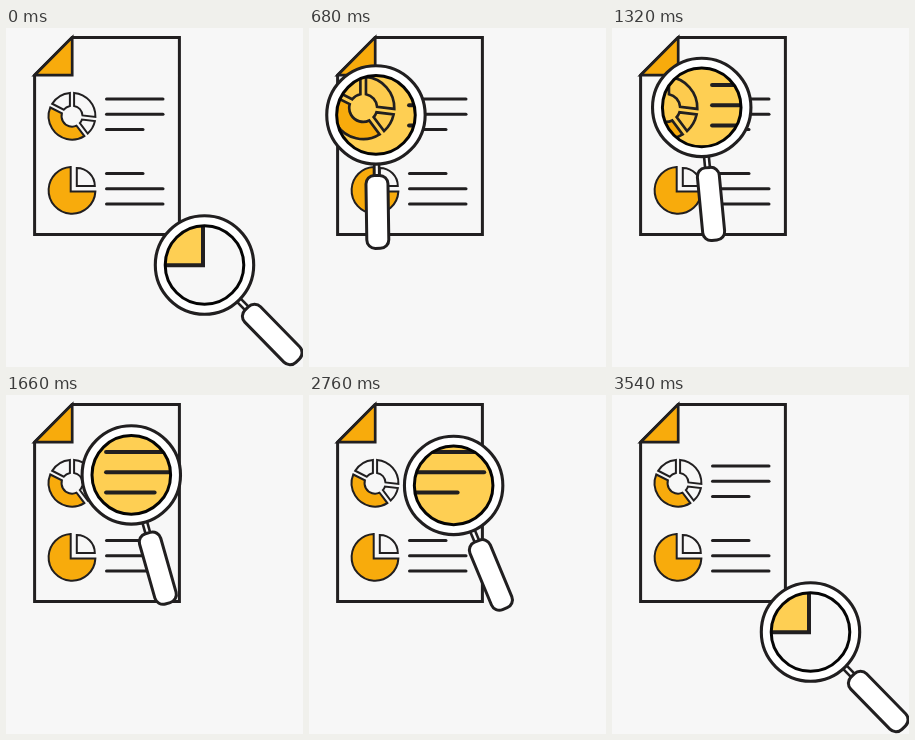
Recreate the animation shown at these times as an HTML page with a canvas. Size 297 by 339 pixels, loop 3730 ms.

```html
<!DOCTYPE html>
<html lang="en">
<head>
<meta charset="utf-8">
<title>Report under a magnifying glass</title>
<style>
  html, body { margin: 0; width: 100%; height: 100%; overflow: hidden; background: #f7f7f7; }
  canvas { display: block; width: 297px; height: 339px; }
</style>
</head>
<body>
<canvas id="stage" width="297" height="339"></canvas>
<script>
const ctx = document.getElementById('stage').getContext('2d');
const LOOP = 3730, STEP = 20, REST = 3540;
const INK = '#211f20', PAPER = '#f7f7f7', ORANGE = '#f8ab0c', YELLOW = '#fecf53';
const ZOOM = 1.33, ZOOM_X = -33.6, ZOOM_Y = -37.4;
const TURN = 2 * Math.PI;
const rad = deg => deg * TURN / 360;

// Where the lens pauses: time, centre
const STOPS = [
  { t: 0, x: 198.5, y: 237 },
  { t: 820, x: 65.7, y: 85.5 },
  { t: 1000, x: 59, y: 79 },
  { t: 2060, x: 133.5, y: 80 },
  { t: 2360, x: 128, y: 79 },
  { t: 2680, x: 141, y: 80.5 },
  { t: 3500, x: 198.5, y: 237 }
];

// Smooth start, longer slow-down
function ease(u) {
  const w = 1 - (1 - u) ** 1.62;
  return w * w * (3 - 2 * w);
}

function lensAt(t) {
  const next = STOPS.findIndex(s => s.t > t);
  if (next < 0) return STOPS[STOPS.length - 1];
  const a = STOPS[next - 1], b = STOPS[next];
  const k = ease((t - a.t) / (b.t - a.t));
  return { x: a.x + (b.x - a.x) * k, y: a.y + (b.y - a.y) * k };
}

// The handle swings out as the lens moves right
const tiltAt = x => rad(44.5) * (Math.max(0, x - 59) / 140) ** 1.38;

function paint(fill, width, stroke = INK) {
  if (fill) { ctx.fillStyle = fill; ctx.fill(); }
  ctx.lineWidth = width;
  ctx.strokeStyle = stroke;
  ctx.stroke();
}

function polygon(points, fill, width) {
  ctx.beginPath();
  points.forEach(p => ctx.lineTo(...p));
  ctx.closePath();
  paint(fill, width);
}

function circle(r, fill, width, stroke) {
  ctx.beginPath();
  ctx.arc(0, 0, r, 0, TURN);
  paint(fill, width, stroke);
}

function line(x1, y1, x2, y2, width) {
  ctx.beginPath();
  ctx.moveTo(x1, y1);
  ctx.lineTo(x2, y2);
  paint(null, width);
}

function ringPart(from, to, fill) {
  const outer = 23.4, inner = 10.5, gap = 2.1;
  ctx.beginPath();
  ctx.arc(66, 88.2, outer, rad(from) + gap / outer, rad(to) - gap / outer);
  ctx.arc(66, 88.2, inner, rad(to) - gap / inner, rad(from) + gap / inner, true);
  ctx.closePath();
  paint(fill, 2);
}

function drawPie(blank) {
  const x = 66, y = 162.3, r = 23.4, cut = 1.3;
  ctx.beginPath();
  ctx.moveTo(x - cut, y + cut);
  ctx.arc(x, y, r, cut / r, TURN * 0.75 - cut / r);
  ctx.closePath();
  paint(ORANGE, 2);

  ctx.beginPath();
  ctx.moveTo(x + 4.8, y - 4.3);
  ctx.arc(x + 4.8, y - 4.3, 18, -TURN / 4, 0);
  ctx.closePath();
  paint(blank, 2);
}

function drawReport(paper, blank) {
  ctx.lineJoin = 'miter';
  polygon([[66, 9.4], [173.4, 9.4], [173.4, 206.5], [28.6, 206.5], [28.6, 47.2]], paper, 3);
  polygon([[28.6, 47.2], [66.2, 47.2], [66.2, 9.4]], ORANGE, 2.7);

  const cuts = [7, 53, 207, 270, 367];
  for (let i = 0; i < 4; i++) ringPart(cuts[i], cuts[i + 1], i === 1 ? ORANGE : blank);
  drawPie(blank);

  // Two text blocks, mirrored top to bottom
  ctx.lineCap = 'round';
  for (let i = 0; i < 3; i++) {
    const end = i < 2 ? 157 : 137;
    line(100.5, 71 + 15.2 * i, end, 71 + 15.2 * i, 3);
    line(100.5, 176 - 15.2 * i, end, 176 - 15.2 * i, 3);
  }
}

function drawHandle(tilt) {
  ctx.save();
  ctx.rotate(-tilt);
  ctx.lineCap = 'butt';
  ctx.fillStyle = '#fff';
  ctx.fillRect(-2.5, 48, 5, 14);
  for (const x of [-2.4, 2.4]) line(x, 48, x, 62, 2.6);
  ctx.beginPath();
  ctx.roundRect(-11, 60.5, 22, 73, 8.5);
  paint('#fff', 3);
  ctx.restore();
}

function drawLens({ x, y }) {
  ctx.save();
  ctx.translate(x, y);
  drawHandle(tiltAt(x));
  circle(49.2, '#fff', 3.1);

  ctx.save();
  ctx.beginPath();
  ctx.arc(0, 0, 39.5, 0, TURN);
  ctx.clip();
  ctx.fillStyle = PAPER;
  ctx.fillRect(-40, -40, 80, 80);
  ctx.translate(ZOOM_X - x, ZOOM_Y - y);
  ctx.scale(ZOOM, ZOOM);
  drawReport(YELLOW, '#fdcb4e');
  ctx.restore();

  circle(39.3, null, 3, '#050505');
  ctx.restore();
}

function frame(now) {
  const t = Math.min(Math.floor((now % LOOP) / STEP) * STEP, REST);
  ctx.fillStyle = PAPER;
  ctx.fillRect(0, 0, 297, 339);
  drawReport(PAPER, PAPER);
  drawLens(lensAt(t));
}

let start = null;
function tick(now) {
  if (start === null) start = now;
  frame(Math.max(0, now - start));
  requestAnimationFrame(tick);
}
frame(0);
requestAnimationFrame(tick);
</script>
</body>
</html>
```
